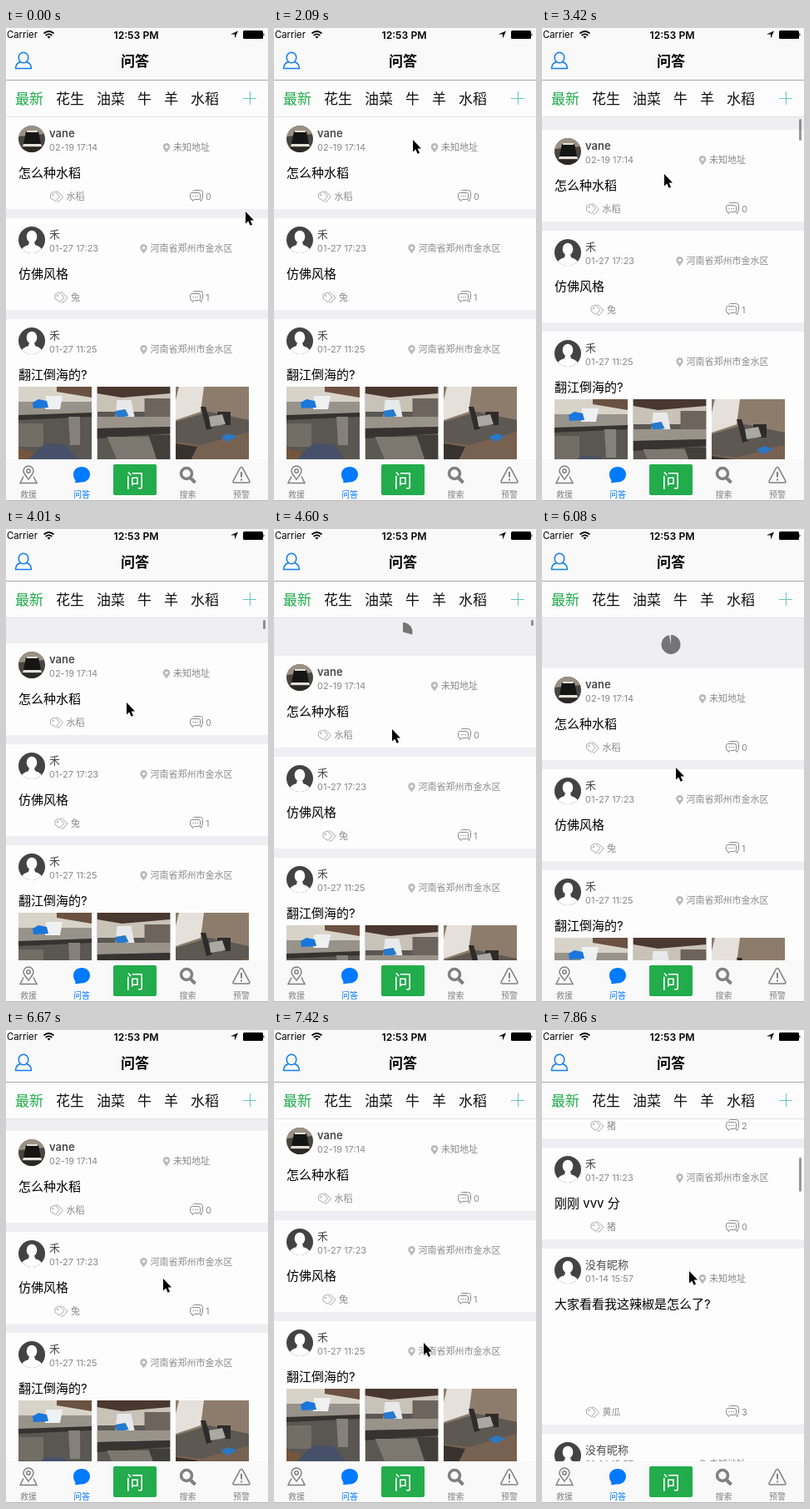
Animation, 315 px wide and 567 px high, one loop 8000 ms. Source, as an HTML page:

```html
<!DOCTYPE html>
<html lang="zh-CN">
<head>
<meta charset="utf-8">
<style>
  html, body { margin: 0; width: 100%; height: 100%; overflow: hidden; background: #eeeef3; }
  svg { display: block; }
  text { font-family: Inter, 'Noto Sans CJK SC', 'Noto Sans CJK', sans-serif; }
  .mid { text-anchor: middle; }
  .small { font-size: 11px; fill: #8a8a8a; }
  .line { fill: none; stroke: #aaa; }
  .tab { font-size: 17px; }
  .foot { font-size: 10px; fill: #808080; text-anchor: middle; }
</style>
</head>
<body>
<svg id="stage" width="315" height="567" viewBox="0 0 315 567">
  <defs>
    <clipPath id="round"><circle cx="31" cy="26" r="16"/></clipPath>
    <g id="face" clip-path="url(#round)">
      <path d="M15 10h32v32H15z" fill="#434343"/>
      <ellipse cx="31" cy="22" rx="6.3" ry="7.3" fill="#fff"/>
      <path d="M18 43c0-8 4-9 9-11l1-4h6l1 4c5 2 9 3 9 11z" fill="#fff"/>
    </g>
    <g id="phone" clip-path="url(#round)">
      <path d="M15 10h32v32H15z" fill="#4a4540"/>
      <path d="M15 10h32v10l-32 3z" fill="#9a9184"/>
      <path d="M24 17h15l3 15H21z" fill="#151515"/>
      <path d="M25 16h13v2H25zM21 32h21l1 3H20z" fill="#e4e0d8"/>
      <path d="M15 36h32v6H15z" fill="#2b2825"/>
    </g>
    <path id="pin" fill="#bbb" fill-rule="evenodd" d="M4.5 0a4.3 4.3 0 0 1 4.3 4.5C8.8 7 6 9 4.5 11.5C3 9 .2 7 .2 4.5A4.3 4.3 0 0 1 4.5 0zM4.5 2.7a1.7 1.7 0 1 0 .1 0z"/>
    <g id="tag" class="line">
      <path d="M.5 8V3l5-2.5 6 5.500-5 6zM7 .5h2l6.500 6-5 6H8"/>
      <circle cx="3.5" cy="4.5" r=".8"/>
    </g>
    <g id="talk" class="line" style="stroke:#8a8a8a">
      <path d="M2.5 3.5h8q2 0 2 2v4q0 2-2 2h-5l-2.5 2v-2q-2.5 0-2.5-2v-4q0-2 2-2z"/>
      <path d="M3.5 1.5q.5-1 2-1h7q3 0 3 3v5q0 2-1.5 2.5v2.5l-2-1.5"/>
      <path d="M3.5 7.5h6.5" stroke-dasharray="1.3 1.3"/>
    </g>
  </defs>

  <g id="list"></g>
  <path id="pie" fill="#757575"/>
  <rect id="bar" x="309" width="3" rx="1.5" fill="#000"/>

  <path d="M0 0h315v106H0z" fill="#fcfcfc"/>
  <path d="M0 0h315v62H0z" fill="#f9f9f9"/>
  <path d="M0 62.5h315" stroke="#a9a9a9"/>
  <path d="M0 106.5h315" stroke="#e3e3e6"/>

  <text x="1" y="12" font-size="11.3">Carrier</text>
  <g fill="none" stroke="#000" stroke-width="1.7">
    <path d="M45.5 6.5q6-5 12 0M47.7 9q3.8-3.2 7.6 0"/>
    <path d="M51.5 12.5l-2-2q2-1.5 4 0z" fill="#000" stroke="none"/>
  </g>
  <text class="mid" x="156.5" y="12.5" font-size="12.2" font-weight="600">12:53 PM</text>
  <path d="M279 3.5l-4 9v-5h-5z"/>
  <rect x="285" y="3" width="24" height="10" rx="1.5"/>
  <path d="M309.5 6q2 2 0 4z"/>

  <g fill="none" stroke="#117df0" stroke-width="1.5">
    <ellipse cx="21" cy="35.5" rx="5.8" ry="6.3"/>
    <path d="M17.500 40.5q-6 2-6 8h19q0-6-6-8"/>
  </g>
  <text class="mid" x="155" y="46" font-size="17" font-weight="700">问答</text>
  <g id="tabs"></g>
  <path d="M285 84.5h16M293.5 76v16" stroke="#6cc5be"/>

  <path d="M0 517h315v50H0z" fill="#f9f9f9"/>
  <path d="M0 566.5h315" stroke="#b8b8b8"/>
  <g fill="none" stroke="#808080" stroke-width="1.5">
    <path d="M27 541c-3-4-6-7-6-10a6 6 0 0 1 12 0c0 3-3 6-6 10zM21 537.5l-4 8h20l-4-8"/>
    <circle cx="27" cy="531" r="2.2"/>
    <circle cx="217" cy="534" r="6.5" stroke-width="3.5"/>
    <path d="M222 539.5l5.5 5.5" stroke-width="4"/>
    <path d="M283 526.5q1 0 1.7 1.3l8 15q.8 2-1 2.2h-17.5q-1.8-.2-1-2.2l8-15q.7-1.3 1.8-1.3z"/>
    <path d="M283 532v6.5M283 540.5v2" stroke-width="2"/>
  </g>
  <path d="M91 526c6 0 10 4 10 9s-4 9.5-10 9.5c-3 0-4 1-8.5.5 1.5-1 1-2 .5-3.5-1.5-2-2-4-2-6.5 0-5 4-9 10-9z" fill="#007aff"/>
  <g id="feet"></g>
  <rect x="129" y="523" width="52" height="37" rx="2" fill="#22ac4c"/>
  <text class="mid" x="155" y="549.5" font-size="22" fill="#fff">问</text>

  <path id="cursor" d="M0 0V14.5L3.3 11.5 5.6 16.7 8 15.7 5.7 10.5H10z" stroke="#fff" stroke-width="1.2" paint-order="stroke"/>
</svg>

<script>
const $ = id => document.getElementById(id);
const area = '河南省郑州市金水区', unknown = '未知地址', nobody = '没有昵称';

// Flat shapes per picture: [path, colour]
const photos = [
  [['M0 0h88v88H0z', '#5a5651'], ['M0 0h88v20H0z', '#d8d3c9'], ['M46 0h42v13l-42-7z', '#6b5141'],
   ['M0 18h88v14L0 36z', '#98938a'], ['M33 11h20l-3 16H32z', '#eef0f2'], ['M17 19l7-4 10 2 2 8-18 1z', '#1976dc'],
   ['M0 34l88-3v5L0 40z', '#35322f'], ['M60 36h14v34H62z', '#85817a'], ['M0 44h30v28H0z', '#726d65'],
   ['M10 88l22-20 24 1 16 19z', '#465068'], ['M0 74l20 5-8 9H0z', '#74563d']],
  [['M0 0h88v88H0z', '#5b5752'], ['M0 0h88v30H0z', '#c9c2b7'], ['M0 0h88v8L30 13 0 8z', '#49382f'],
   ['M57 14h31v22H57z', '#6d655d'], ['M24 16h17l4 20H22z', '#e8e9ea'], ['M22 29l12-2 4 8-15 3z', '#2679cc'],
   ['M0 36h88v12L0 50z', '#99938a'], ['M0 50l88-2v8L0 62z', '#363330'], ['M12 60h50l14 28H24z', '#7c776f'],
   ['M62 58h26v30H72z', '#423e3a']],
  [['M0 0h88v88H0z', '#776151'], ['M0 0h88v46H0z', '#8d7c6c'], ['M4 0h30l-4 30-30 10V16z', '#e5e1da'],
   ['M0 42l40-12 48 10v14L30 70 0 66z', '#5d5851'],
   ['M30 24h6l8 26-7 2zM50 30h16v16H50z', '#2e2c2a'], ['M40 36l16-3 4 12-18 3z', '#a9a8a2'],
   ['M54 60l10-4 10 4-12 6z', '#2b78c4'], ['M0 68l26 4-8 16H0z', '#38322e']]
];

// name, date, place, question, topic, replies, picture row: 0 none, 1 pictures, 2 blank
const posts = [
  ['vane', '02-19 17:14', unknown, '怎么种水稻', '水稻', 0, 0],
  ['禾', '01-27 17:23', area, '仿佛风格', '兔', 1, 0],
  ['禾', '01-27 11:25', area, '翻江倒海的?', '猪', 2, 1],
  ['禾', '01-27 11:23', area, '刚刚 vvv 分', '猪', 0, 0],
  [nobody, '01-14 15:57', unknown, '大家看看我这辣椒是怎么了?', '黄瓜', 3, 2],
  [nobody, '01-14 15:57', unknown, '', '黄瓜', 0, 0]
];

const photo = (shapes, i) =>
  `<svg x="${15 + 94.5 * i}" y="81" width="88" height="88">` +
  shapes.map(([d, c]) => `<path d="${d}" fill="${c}"/>`).join('') + '</svg>';

function post([name, date, place, ask, topic, replies, row], i, y) {
  const low = row ? 101 : 0;
  const placeX = 223 - place.length * 5.5, topicX = 83.5 - topic.length * 5.5;
  return `<g transform="translate(0 ${y})">
    <path d="M0 0h315v${110 + low}H0z" fill="#fdfdfd"/>
    <use href="#${i ? 'face' : 'phone'}"/>
    <text x="52" y="23.5" font-size="13" font-weight="${i ? 500 : 600}" fill="#4a4a4a">${name}</text>
    <text class="small" x="52" y="40">${date}</text>
    <use href="#pin" x="${placeX - 12.5}" y="31"/>
    <text class="small" x="${placeX}" y="39.5">${place}</text>
    <text x="15" y="72" font-size="15">${ask}</text>
    ${row == 1 ? photos.map(photo).join('') : ''}
    <use href="#tag" x="${topicX - 19.5}" y="${88.5 + low}"/>
    <text class="small" x="${topicX}" y="${99 + low}">${topic}</text>
    <use href="#talk" x="221" y="${87 + low}"/>
    <text class="small" x="240" y="${99 + low}">${replies}</text></g>`;
}

let postY = 107;
$('list').innerHTML = posts.map((p, i) => {
  const html = post(p, i, postY);
  postY += p[6] ? 222 : 121;
  return html;
}).join('');

$('tabs').innerHTML = [['最新', 11], ['花生', 60], ['油菜', 109], ['牛', 158], ['羊', 190], ['水稻', 222]]
  .map(([s, x], i) => `<text class="tab" x="${x}" y="90.5" fill="${i ? '#111' : '#22ac4c'}">${s}</text>`).join('');
$('feet').innerHTML = [['救援', 27], ['问答', 91], ['搜索', 218.5], ['预警', 283]]
  .map(([s, x], i) => `<text class="foot" x="${x}" y="562.5" ${i == 1 ? 'style="fill:#007aff"' : ''}>${s}</text>`).join('');

// Tracks are [step, value...]; the screen refreshes 54 times per loop
const LOOP = 8000, STEPS = 54;
const pointer = [[0, 288, 220], [3, 301, 221], [8, 266, 186], [14, 167, 134], [15, 143, 131], [18, 135, 142],
  [19, 135, 142], [23, 147, 175], [31, 142, 240], [36, 140, 275], [38, 140, 277], [45, 189, 298],
  [49, 180, 375], [50, 180, 375], [52, 177, 300], [53, 177, 289]];
const pull = [[0, 0], [19, 0], [23, 15], [31, 45], [36, 60], [43, 60], [44, 42], [45, 14], [46, 0],
  [50, 0], [51, -90], [52, -270], [53, -430]];
const barAlpha = [[0, 0], [19, 0], [20, .4], [38, .4], [41, 0], [50, 0], [51, .4], [53, .4]];

function at(track, k) {
  const i = track.findIndex(p => p[0] >= k);
  if (i < 1) return track[0].slice(1);
  const a = track[i - 1], b = track[i], u = (k - a[0]) / (b[0] - a[0]);
  return a.slice(1).map((v, j) => v + (b[j + 1] - v) * u);
}

function drawPie(y, part) {
  if (part <= 0) return $('pie').setAttribute('d', '');
  const a = 2 * Math.PI * Math.min(part, .975), r = 11.5;
  $('pie').setAttribute('d', `M155 ${y}v${-r}A${r} ${r} 0 ${a > Math.PI ? 1 : 0} 1 ` +
    `${155 + r * Math.sin(a)} ${y - r * Math.cos(a)}z`);
}

function frame(now) {
  const k = Math.floor(now % LOOP / LOOP * STEPS);
  const [x, y] = at(pointer, k), off = Math.round(at(pull, k)[0]);
  $('cursor').setAttribute('transform', `translate(${Math.round(x)} ${Math.round(y)})`);
  $('list').setAttribute('transform', `translate(0 ${off})`);
  drawPie(78.5 + off, (off - 38.6) / 22);
  $('bar').setAttribute('y', 109 + Math.max(0, -off) * .102);
  $('bar').setAttribute('height', Math.max(7, 41 - Math.max(0, off)));
  $('bar').setAttribute('opacity', at(barAlpha, k)[0]);
  requestAnimationFrame(frame);
}
requestAnimationFrame(frame);
</script>
</body>
</html>
```
